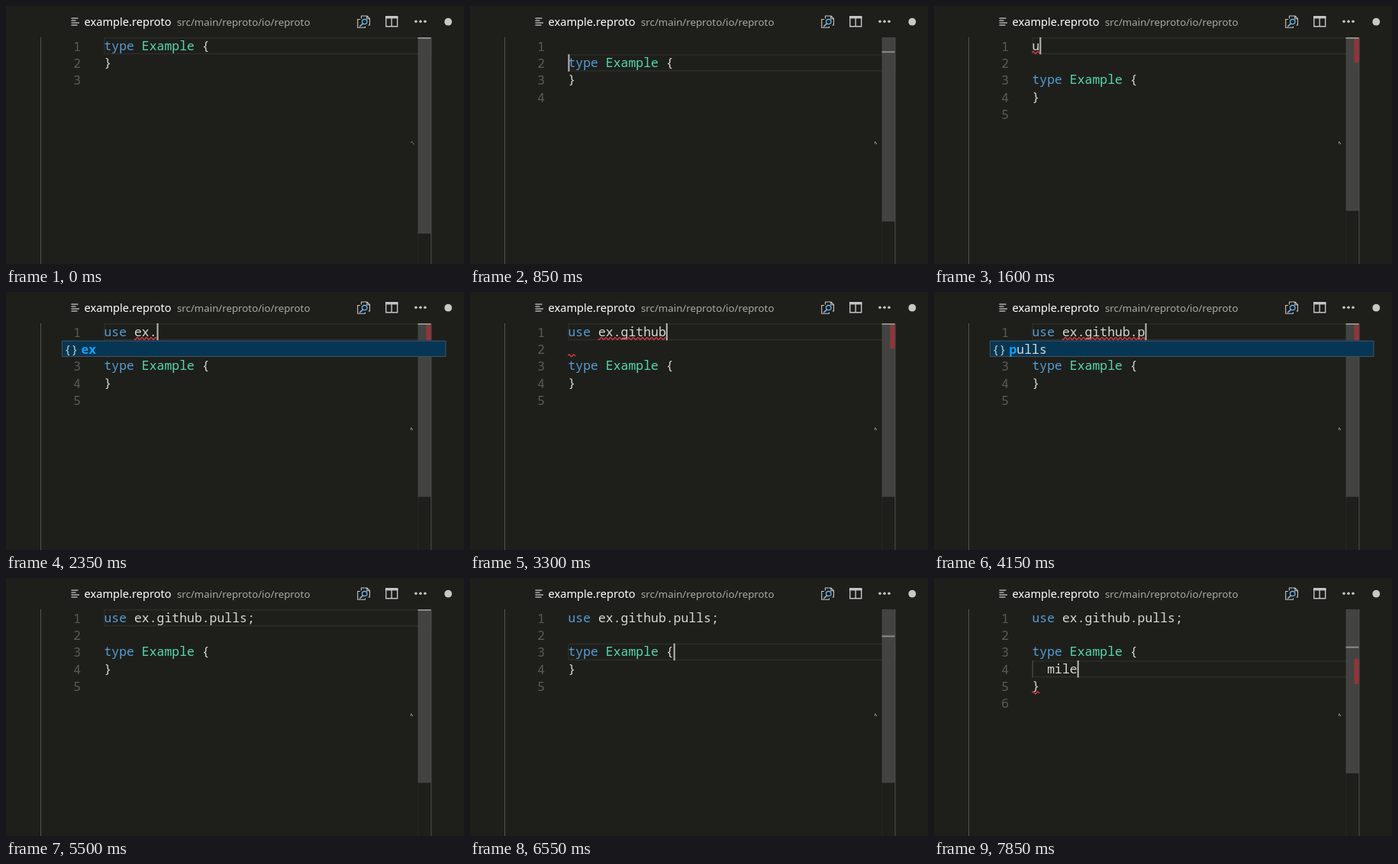
Animation of 600 by 338 pixels, one loop 8 s. Source, as an HTML page with a canvas:

```html
<!DOCTYPE html>
<html lang="en">
<head>
<meta charset="utf-8">
<title>Editor typing</title>
<style>
html, body { margin: 0; height: 100%; overflow: hidden; background: #1e1f1b; }
canvas { display: block; }
</style>
</head>
<body>
<canvas id="stage" width="600" height="338"></canvas>
<script>
const c = document.getElementById('stage').getContext('2d');
const LOOP = 8000, BLINK = 500;
const LEFT = 128.5, TOP = 41, LINE = 22.35, ADV = 9.87, VIEW = 296;
const MONO = '16.45px "Noto Sans Mono", "DejaVu Sans Mono", monospace';
const SANS = '"Noto Sans", "Open Sans", sans-serif';
const BG = '#1e1f1b', TEXT = '#d8d8d2', BLUE = '#569cd6', GREEN = '#56d8af', ICON = '#c5c5c5';

const block = ['type Example {', '}', ''];
const withUse = s => [s, '', ...block];
const withField = s => ['use ex.github.pulls;', '', block[0], s, '}', ''];
const pathErr = end => [[0, 4, end], [1, 0, 1]];
const modules = ['issues', 'pulls', 'repos', 'users'];

// [time, changes]; setting col restarts the caret blink
const steps = [
  [0, { code: block, row: 0, col: 0, err: [], pop: [], hit: 0 }],
  [750, { code: ['', ...block], row: 1, col: 0 }],
  [900, { code: withUse(''), row: 2, col: 0 }],
  [1100, { row: 1, col: 0 }],
  [1250, { row: 0, col: 0 }],
  [1600, { code: withUse('u'), col: 1, err: [[0, 0, 1]] }],
  [1700, { code: withUse('us'), col: 2, err: [[0, 0, 2]] }],
  [1800, { code: withUse('use'), col: 3, err: [[0, 0, 3]] }],
  [1900, { code: withUse('use '), col: 4, err: [[0, 0, 3], [2, 0, 4]] }],
  [2050, { code: withUse('use e'), col: 5, err: pathErr(5) }],
  [2100, { pop: ['ex'], hit: 1 }],
  [2200, { code: withUse('use ex'), col: 6, err: pathErr(6), hit: 2 }],
  [2350, { code: withUse('use ex.'), col: 7, err: pathErr(7) }],
  [2400, { pop: [] }],
  [2450, { pop: ['github'], hit: 0 }],
  [3300, { code: withUse('use ex.github'), col: 13, err: pathErr(13), pop: [] }],
  [3750, { code: withUse('use ex.github.'), col: 14, err: pathErr(14) }],
  [3850, { pop: modules }],
  [4150, { code: withUse('use ex.github.p'), col: 15, err: pathErr(15), pop: ['pulls'], hit: 1 }],
  [4250, { col: 15 }],
  [4700, { code: withUse('use ex.github.pulls'), col: 19, err: pathErr(19), pop: [] }],
  [4950, { code: withUse('use ex.github.pulls;'), col: 20 }],
  [5000, { col: 20 }],
  [5100, { err: [] }],
  [5650, { row: 1, col: 0 }],
  [5800, { row: 2, col: 0 }],
  [6000, { row: 3, col: 0 }],
  [6500, { row: 2, col: 0 }],
  [6550, { col: 14 }],
  [6800, { code: withField('  '), row: 3, col: 2 }],
  [7150, { code: withField('  m'), col: 3 }],
  [7250, { code: withField('  mi'), col: 4, err: [[4, 0, 1]] }],
  [7700, { code: withField('  mil'), col: 5 }],
  [7850, { code: withField('  mile'), col: 6 }]
];

function stateAt(t) {
  const s = { caretFrom: -750 };
  for (const [at, change] of steps) {
    if (at > t) break;
    Object.assign(s, change);
    if (at && 'col' in change) s.caretFrom = at;
  }
  return s;
}

const colX = col => LEFT + col * ADV;
const rowY = row => TOP + row * LINE;

function rect(x, y, w, h, color) {
  c.fillStyle = color;
  c.fillRect(x, y, w, h);
}

function disc(x, y, r, color) {
  c.fillStyle = color;
  c.beginPath();
  c.arc(x, y, r, 0, 7);
  c.fill();
}

function path(d, color, width) {
  c.strokeStyle = color;
  c.lineWidth = width;
  c.stroke(new Path2D(d));
}

function text(s, x, y, color, font = MONO) {
  c.font = font;
  c.fillStyle = color;
  c.fillText(s, x, y);
}

function drawHeader() {
  [9, 6, 10.5, 8].forEach((w, i) => rect(85.5, 15.4 + i * 3, w, 1.3, ICON));
  text('example.reproto', 102.5, 26, '#fff', '14.63px ' + SANS);
  text('src/main/reproto/io/reproto', 224, 26, '#a9a9a6', '13.27px ' + SANS);

  path('M465.5 16.5V13H473L476.5 16.5V25H474.5M472.8 13V16.8H476.5M464 17.5H460.7V28.3H470.5V26.5', ICON, 1.1);
  path('M467.6 23.2L463.2 27', '#75beff', 1.6);
  path('M473 20.5A3.2 3.2 0 1 1 466.6 20.5A3.2 3.2 0 1 1 473 20.5', '#75beff', 1.2);

  path('M497.8 14V26.8H512.7V14M505.2 14V27', ICON, 1.4);
  rect(497, 13, 16.5, 3.4, ICON);
  for (const x of [537, 543, 549]) disc(x, 20.3, 1.8, ICON);
  disc(579.3, 20.7, 4.9, '#c8c8c6');
}

function drawCode(s) {
  s.code.forEach((line, row) => {
    const base = rowY(row) + 16.7;
    c.textAlign = 'right';
    text(row + 1, 98, base + 0.9, '#5a5b58');
    c.textAlign = 'left';
    for (const m of line.matchAll(/\S+/g)) {
      const color = /^(use|type)$/.test(m[0]) ? BLUE : m[0] === 'Example' ? GREEN : TEXT;
      text(m[0], colX(m.index), base, color);
    }
    if (line.startsWith('  ')) rect(128.7, rowY(row), 1.2, LINE, '#4a4b48');
  });
}

function squiggle([row, from, to]) {
  const end = colX(to), y = rowY(row) + 20;
  c.strokeStyle = '#e33b45';
  c.lineWidth = 1.3;
  c.beginPath();
  for (let x = colX(from); x <= end; x += 0.5)
    c.lineTo(x, y - 1.4 * Math.sin((x - LEFT) * Math.PI / 3));
  c.stroke();
}

function drawRuler(s) {
  const scale = VIEW / (VIEW + (s.code.length - 1) * LINE);
  const rulerY = row => TOP + row * LINE * scale;
  rect(539.6, TOP, 1, 297, '#292a27');
  rect(539.6, TOP, 17.4, VIEW * scale, '#434441');
  if (s.err.length) rect(550.5, rulerY(s.err[0][0]), 6.5, 33, '#92343a');
  rect(539.6, rulerY(s.row), 17.4, 2, '#8b8c89');
  rect(556.4, TOP, 1.1, 297, '#4b4c49');
}

function drawPopup(s) {
  if (!s.pop.length) return;
  const y = rowY(1) + 0.3, h = s.pop.length * LINE - 1;
  rect(73, y, 503.5, h, '#252526');
  rect(73, y, 503.5, LINE - 1, '#073655');
  path(`M73.5 ${y + .5}H576V${y + h - .5}H73.5Z`, '#41535f', 1);
  s.pop.forEach((item, i) => {
    const base = y + i * LINE + 17;
    text('{}', 76.5, base - 0.8, '#d4d0c4', MONO.replace('16.45', '14.8'));
    text(item.slice(0, s.hit), 98.5, base, '#18a0f5', 'bold ' + MONO);
    text(item.slice(s.hit), 98.5 + s.hit * ADV, base, TEXT);
  });
}

function draw(t) {
  const s = stateAt(t);
  rect(0, 0, 600, 338, BG);
  drawHeader();
  rect(45, TOP, 1.1, 297, '#51524f');
  c.strokeStyle = '#2b2c29';
  c.lineWidth = 1.6;
  c.strokeRect(129, rowY(s.row) + 0.8, 428, LINE - 1.6);
  drawCode(s);
  s.err.forEach(squiggle);
  drawRuler(s);
  if (Math.floor((t - s.caretFrom) / BLINK) % 2 === 0)
    rect(colX(s.col), rowY(s.row), 2, LINE, '#b8b8b3');
  drawPopup(s);
  path(t < 350 ? 'M530 179L531.5 177.8L533 179M533 180L534.5 180.8'
               : 'M530.5 177.5V180.5M530.8 178L533 180.2L531.5 181', '#8d8e8b', 1);
}

function frame(now) {
  draw((now - start) % LOOP);
  requestAnimationFrame(frame);
}
const start = performance.now();
draw(0);
requestAnimationFrame(now => frame(Math.max(now, start)));
</script>
</body>
</html>
```
